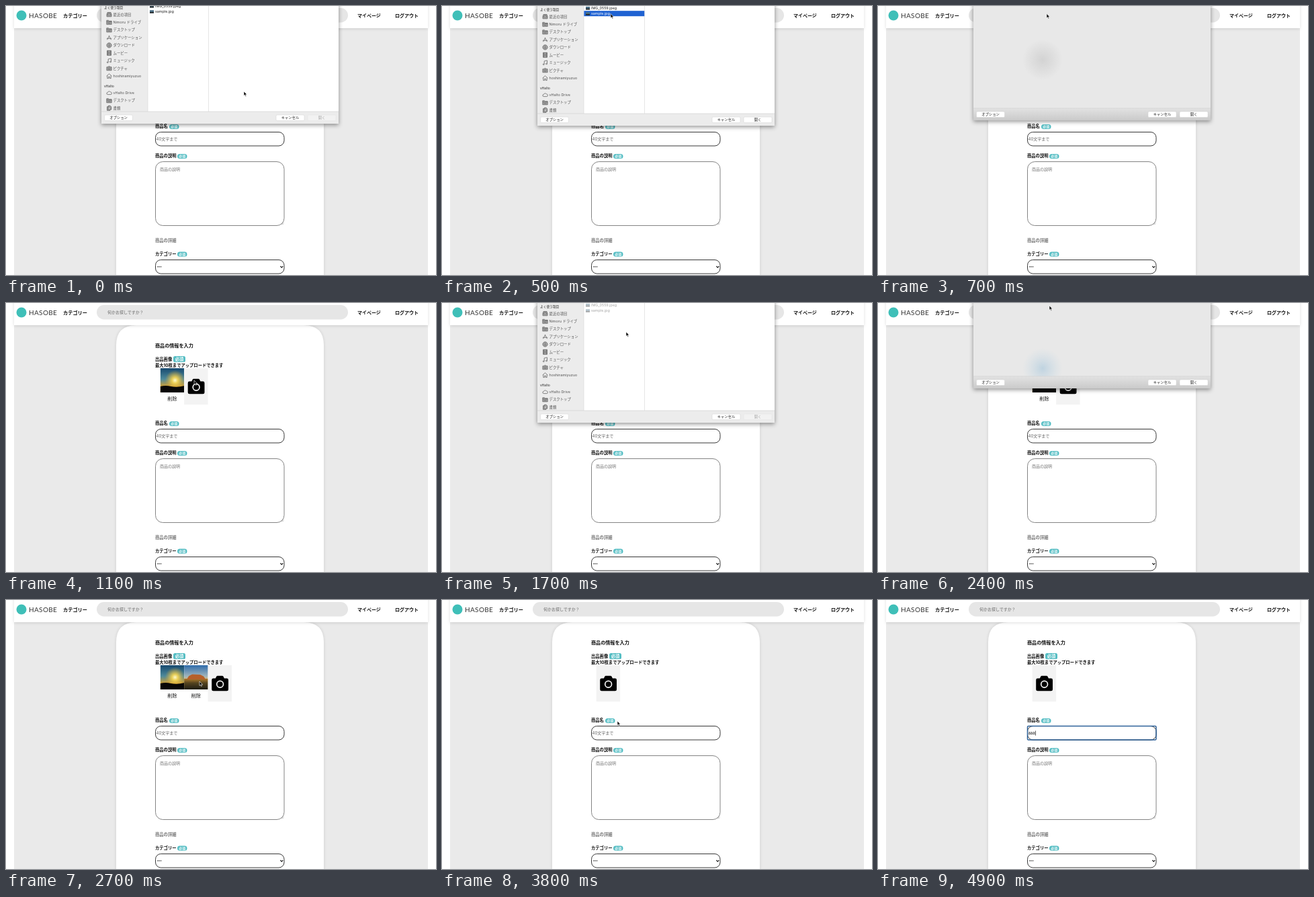
An HTML page for the animation above (5000 ms loop, 640x400 px).

```html
<!DOCTYPE html>
<html>
<head>
<meta charset="utf-8">
<title>Listing form</title>
<style>
html, body { margin: 0; width: 100%; height: 100%; overflow: hidden; background: #fff; }
svg { display: block; }
text { font-family: Inter, "Noto Sans CJK JP", "Noto Sans CJK", sans-serif; white-space: pre; }
.b { font-weight: 700; }
.m { text-anchor: middle; }
#dialog { filter: drop-shadow(0 2px 3px rgba(0,0,0,.42)); }
#header { filter: drop-shadow(0 1px 2px rgba(0,0,0,.13)); }
#panel { filter: drop-shadow(0 0 2px rgba(0,0,0,.12)); }
</style>
</head>
<body>
<svg id="stage" width="640" height="400" viewBox="0 0 640 400"></svg>
<script>
const LOOP = 5000, STEP = 100, FULL = 178, TEAL = '#56bec4';

const label = (x, cy, size, str, fill = '#111', cls = '') =>
  `<text x="${x}" y="${cy + size * 0.37}" font-size="${size}" fill="${fill}" class="${cls}">${str}</text>`;
const box = (x, y, w, h, fill, rx = 0, more = '') =>
  `<rect x="${x}" y="${y}" width="${w}" height="${h}" fill="${fill}" rx="${rx}" ${more}/>`;
const field = (y, h, rx, color, id = '') =>
  box(222.5, y, 191.5, h, '#fff', rx, `stroke="${color}" stroke-width=".9" ${id}`);
const badge = (x, cy, w = 14.5, h = 7.2, size = 5, rx = 3.6) =>
  box(x, cy - h / 2, w, h, TEAL, rx) + label(x + w / 2, cy, size, '必須', '#fff', 'b m');

const defs = `<defs>
  <linearGradient id="sky0" x2="0" y2="1"><stop stop-color="#16496f"/><stop offset=".45" stop-color="#4e8a9b"/>
    <stop offset=".78" stop-color="#d9a12c"/></linearGradient>
  <radialGradient id="sun"><stop stop-color="#fffbd0"/><stop offset=".3" stop-color="#f8d752" stop-opacity=".9"/>
    <stop offset="1" stop-color="#e0a52c" stop-opacity="0"/></radialGradient>
  <linearGradient id="sky1" x2="0" y2="1"><stop stop-color="#2f6cab"/><stop offset=".45" stop-color="#9fb4bc"/>
    <stop offset=".6" stop-color="#d8b878"/></linearGradient>
  <linearGradient id="land" x2="0" y2="1"><stop stop-color="#b07a2c"/><stop offset=".4" stop-color="#54441f"/>
    <stop offset="1" stop-color="#1d1c14"/></linearGradient>
  <linearGradient id="bar" x2="0" y2="1"><stop stop-color="#e2e2e2"/><stop offset="1" stop-color="#cacaca"/></linearGradient>
  <radialGradient id="blur0"><stop stop-color="#d3d3d3"/><stop offset="1" stop-color="#d3d3d3" stop-opacity="0"/></radialGradient>
  <radialGradient id="blur1"><stop stop-color="#bfd3e0"/><stop offset="1" stop-color="#cfdde6" stop-opacity="0"/></radialGradient>
  <clipPath id="sheet"><rect x="142" y="-20" width="353" height="${FULL + 20}"/></clipPath>
  <g id="cam">${box(0, 0, 35.5, 54, '#f3f3f3')}
    <path d="M8 19.5h3.2l1.7-3.2q.4-.6 1.2-.6h7.3q.8 0 1.2.6l1.7 3.2H28q2.4 0 2.4 2.4v14q0 2.3-2.4 2.3H8q-2.4 0-2.4-2.3v-14q0-2.4 2.4-2.4z"/>
    <circle cx="18" cy="28.3" r="4.9" fill="none" stroke="#f6f6f6" stroke-width="1.7"/></g>
  <svg id="pic0" width="35.5" height="36" viewBox="0 0 35.5 36">${box(0, 0, 36, 36, 'url(#sky0)')}
    <circle cx="22" cy="18" r="15" fill="url(#sun)"/><path d="M0 27q8-2 16 0t20-1v10H0z" fill="#080706"/></svg>
  <svg id="pic1" width="35.5" height="36" viewBox="0 0 35.5 36">${box(0, 0, 36, 36, 'url(#sky1)')}
    ${box(0, 20, 36, 16, 'url(#land)')}<path d="M4 21l3-5 5-2.4 12 .3 5 2.6 3 4.5z" fill="#b6602a"/></svg>
</defs>`;

const page = `
  ${box(12, 0, 616, 400, '#eaeaea')}
  <path id="panel" d="M164 401V63q0-30 30-30h249q30 0 30 30v338z" fill="#fff"/>
  <g id="header">${box(12, -5, 616, 38, '#fff')}</g>
  <circle cx="23" cy="14" r="7.5" fill="#3fbfb8"/>
  <text x="34" y="17.8" font-size="10" letter-spacing=".35" fill="#333" style="font-family:Lato,sans-serif">HASOBE</text>
  ${label(85, 14, 7.2, 'カテゴリー', '#111', 'b')}
  ${box(135, 3, 374, 21.5, '#e6e6e6', 10.7)}
  ${label(151, 14, 6, '何かお探しですか？', '#666')}
  ${label(523, 14, 7, 'マイページ', '#111', 'b')}
  ${label(579, 14, 7, 'ログアウト', '#111', 'b')}
  ${label(222, 63.5, 7.1, '商品の情報を入力', '#111', 'b')}
  ${label(222, 83.5, 6.3, '出品画像', '#111', 'b')}${badge(249, 83.5, 18, 9, 6.3, 2.5)}
  ${label(222, 92.5, 6.3, '最大10枚までアップロードできます', '#111', 'b')}
  <g id="slots"></g>
  ${label(222, 179, 6.3, '商品名', '#111', 'b')}${badge(243, 179.5)}
  ${field(187.5, 20.5, 8, '#222')}
  ${box(222.5, 187.5, 191.5, 20.5, 'none', 1.5, 'id="focus" stroke="#2e6299" stroke-width="1.5"')}
  <g id="entry"></g>
  ${label(222, 223, 6.3, '商品の説明', '#111', 'b')}${badge(255, 223.5)}
  ${field(231.5, 95, 11, '#777')}
  ${label(229, 243, 6, '商品の説明', '#777')}
  <path d="M409.5 325l3.5-3.5M411.5 325l1.5-1.5" stroke="#777" stroke-width=".6"/>
  ${label(222, 349, 6.3, '商品の詳細', '#777', 'b')}
  ${label(222, 368.5, 6.3, 'カテゴリー', '#111', 'b')}${badge(255, 369.2)}
  ${field(377.5, 20.5, 8, '#222')}
  <path d="M225 387.8h6.5" stroke="#222" stroke-width=".9" stroke-dasharray="1.9 .4"/>
  <path d="M408.3 386.8l2 2 2-2" fill="none" stroke="#111" stroke-width="1.2"/>`;

// Sidebar icons, drawn in an 8 x 8 cell
const icons = {
  recent: 'M.5 4l1-3h5l1 3v3.2h-7zM2 2.5h4M.5 4.3h2l.5 1h2l.5-1h2',
  folder: 'M.3 1.3h2.8l.8 1h3.8v5H.3zM.3 3.4h7.4M2 5.5h4',
  apps: 'M1 7.3L4.4 1M3.6 1L7 7.3M.3 5.3h7.4',
  down: 'M4 .4a3.6 3.6 0 1 1-.01 0zM4 2v3.6M2.5 4.2L4 5.8l1.5-1.6',
  film: 'M1 .5h6v7H1zM2.3.5v7M5.7.5v7M2.3 4h3.4',
  note: 'M2.7 6.3V1.6L7 .7v4.8M2.7 6.4a1 .8 0 1 1-.1-.3M7 5.6a1 .8 0 1 1-.1-.3',
  photo: 'M.4 2h2l.6-.9h2l.6.9h2v5H.4zM4 3a1.4 1.4 0 1 1-.01 0z',
  home: 'M.2 4L4 .6 7.8 4M1.3 3.4v4h1.9V5h1.6v2.4h1.9v-4',
  cloud: 'M2 6.6a1.6 1.6 0 0 1 0-3.2 2.2 2.2 0 0 1 4-.4 1.8 1.8 0 0 1 .2 3.6z',
  docs: 'M2.8.4h2.8l1.6 1.7v4H2.8zM2.8 1.8H1v5.6h4.4V6.1'
};
const solid = ['recent', 'folder', 'down', 'film', 'photo', 'docs'];
const places = [
  ['最近の項目', 'recent'], ['Nimoru ドライブ', 'folder'], ['デスクトップ', 'folder'],
  ['アプリケーション', 'apps'], ['ダウンロード', 'down'], ['ムービー', 'film'],
  ['ミュージック', 'note'], ['ピクチャ', 'photo'], ['hoshinamiyuzuo', 'home']
];
const cloudPlaces = [['vHalto Drive', 'cloud'], ['デスクトップ', 'folder'], ['書類', 'docs']];
const entries = (list, top) => list.map(([name, icon], i) => {
  const y = top + i * 11.45;
  return `<path d="${icons[icon]}" transform="translate(149.5 ${y - 4})" fill="${solid.includes(icon) ? '#a5a5a5' : 'none'}"
    stroke="#666" stroke-width=".8"/>` + label(159.5, y, 5.4, name, '#555');
}).join('');
const button = (x, str, id = '') => `<g ${id}>${box(x, 165, 42, 8.6, '#fff', 1.6, 'stroke="#d0d0d0" stroke-width=".5"')}
  ${label(x + 21, 169.3, 5.3, str, '#222', 'm')}</g>`;

const dialog = `<g id="dialog">
  ${box(142, -20, 353, FULL + 20, '#e8e8e8', 1.5)}
  <g id="browser">
    ${box(142, -20, 69, 180, '#ececec')}${box(211, -20, 284, 180, '#fff')}
    <path d="M211 -20V160M301.5 -20V160" stroke="#dcdcdc" stroke-width=".7"/>
    ${label(146, 5.5, 4.7, 'よく使う項目', '#666', 'b')}${entries(places, 15.6)}
    ${label(146, 122, 4.7, 'vHalto', '#666', 'b')}${entries(cloudPlaces, 132)}
    <g id="files"></g>
  </g>
  <g clip-path="url(#sheet)"><circle id="ghost" cx="245" r="30"/></g>
  <rect id="footer" x="142" y="160" width="353" height="18"/>
  <path d="M142 160h353" stroke="#cfcfcf" stroke-width=".6"/>
  ${button(146.5, 'オプション')}${button(402, 'キャンセル')}${button(449, '開く', 'id="open"')}
</g>`;

const pointer = `<g id="pointer">
  <path id="arrow" d="M0 0V6.4l1.5-1.3 1 2.3 1.1-.5-1-2.2h2z" stroke="#fff" stroke-width=".6"/>
  <path id="beam" d="M-1.3 -3.5h2.6M0 -3.5v7M-1.3 3.5h2.6" stroke="#222" stroke-width=".8"/></g>`;

document.getElementById('stage').innerHTML = defs + page + dialog + pointer;
const el = id => document.getElementById(id);
const show = (id, on) => el(id).style.display = on ? '' : 'none';
const put = (id, html) => { if (el(id).dataset.html !== html) el(id).innerHTML = el(id).dataset.html = html; };

// Keys are [time, values...]; linear between, held outside
function track(keys, t) {
  const i = keys.findIndex(k => k[0] > t);
  if (i < 0) return keys[keys.length - 1].slice(1);
  if (i === 0) return keys[0].slice(1);
  const a = keys[i - 1], b = keys[i], p = (t - a[0]) / (b[0] - a[0]);
  return a.slice(1).map((v, n) => v + (b[n + 1] - v) * p);
}
const closing = t => [[t, FULL], [t + 100, 170], [t + 200, 127], [t + 300, 60], [t + 400, -30]];
const sheetKeys = [[0, 175], [100, FULL], ...closing(600),
  [1300, -30], [1400, 60], [1500, 145], [1600, 175], [1700, FULL], ...closing(2200)];
const pointerKeys = [[0, 354, 127], [100, 346, 108], [300, 284, 36], [500, 251, 11.5], [700, 251, 11.5],
  [900, 258, 55], [1100, 280, 115], [1300, 283, 122], [1500, 280, 88], [1700, 274, 43], [1900, 261, 12],
  [2100, 255, 4], [2400, 255, 4], [2600, 280, 98], [2700, 288, 121], [2900, 283, 142], [3100, 283, 142],
  [3300, 247, 142], [3400, 247, 142], [3600, 261, 180], [3800, 261, 180], [4000, 258, 198]];

function render(t) {
  const during = (from, to) => t >= from && t < to;

  const count = during(2600, 3100) ? 2 : during(1000, 3400) ? 1 : 0;
  let slots = '';
  for (let i = 0; i < count; i++) {
    const x = 229.6 + i * 35.5;
    slots += `<use href="#pic${i}" x="${x}" y="97"/>` + label(x + 17.8, 142, 7.1, '削除', '#111', 'm');
  }
  put('slots', slots + `<use href="#cam" x="${229.6 + count * 35.5}" y="97"/>`);

  const typed = 'a'.repeat(t < 4400 ? 0 : Math.min(3, 1 + Math.floor((t - 4400) / 200)));
  show('focus', t >= 4000);
  const caretX = 224 + typed.length * 3.4;
  put('entry', (typed ? label(223.5, 198, 6, typed) : label(223.5, 198, 6, '40文字まで', '#666')) +
    (t >= 4000 ? box(caretX, 194.5, 0.7, 7, '#111') : ''));

  const [bottom] = track(sheetKeys, t);
  const dy = bottom - FULL, second = t >= 1300;
  const blank = during(700, 1000) || during(2300, 2600);
  const picked = during(500, 700) ? 1 : during(2100, 2300) ? 0 : -1;
  const waiting = during(1300, 1800);
  show('dialog', bottom > 0);
  el('dialog').setAttribute('transform', `translate(0 ${dy})`);
  show('browser', !blank);
  show('ghost', blank);
  el('ghost').setAttribute('cy', (second ? 97 : 80) - dy);
  el('ghost').setAttribute('fill', `url(#blur${+second})`);
  el('footer').setAttribute('fill', blank ? 'url(#bar)' : '#ececec');
  el('open').setAttribute('opacity', blank || picked >= 0 ? 1 : 0.35);
  put('files', ['IMG_0559.jpeg', 'sample.jpg'].map((name, i) => {
    const y = 3 + i * 8.2, on = picked === i;
    return (on ? box(211.4, y - 4, 89.8, 8, '#1f62d2') : '') +
      `<g opacity="${waiting ? 0.4 : 1}">${box(214, y - 2, 6, 4.4, '#4b7087')}${box(214, y + 0.7, 6, 1.7, '#222')}` +
      label(222, y, 5.4, name, on ? '#fff' : '#222') + '</g>';
  }).join(''));

  const [x, y] = track(pointerKeys, t);
  const overInput = y > 187;
  show('pointer', t < 4400);
  show('arrow', !overInput);
  show('beam', overInput);
  el('pointer').setAttribute('transform', `translate(${x} ${y})`);
}

const start = performance.now();
function tick() {
  const t = (performance.now() - start) % LOOP;
  render(Math.floor(t / STEP) * STEP);
  requestAnimationFrame(tick);
}
tick();
</script>
</body>
</html>
```
